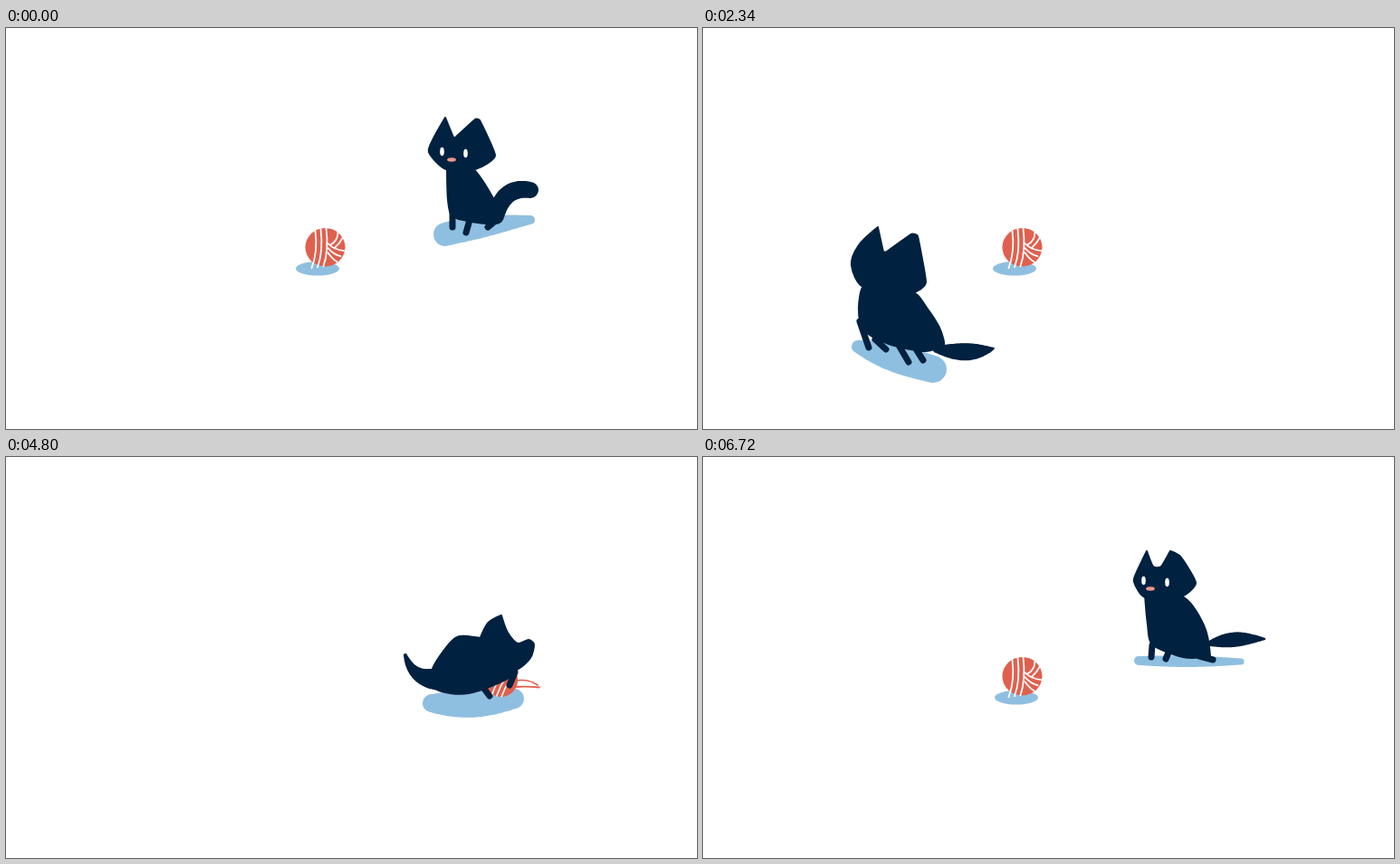
An HTML page with a canvas that plays this animation: 763x443 px, repeating every 6840 ms.

```html
<!DOCTYPE html>
<html lang="en">
<head>
<meta charset="utf-8">
<title>Cat and yarn</title>
<style>
html, body { margin: 0; width: 100%; height: 100%; overflow: hidden; background: #fff; }
canvas { display: block; }
</style>
</head>
<body>
<canvas id="stage" width="763" height="443"></canvas>
<script>
const ctx = document.getElementById('stage').getContext('2d');
const LOOP = 6840, NAVY = '#00213f', SHADE = '#8fbfe0', YARN = '#e0604e', PINK = '#f0968e';

// shadow, tail: start, bend, end, start radius, end radius, bulge
// head: cheek, left ear, right ear, cheek, chin; face: middle of eyes, nose x
const poses = {
  sit: {
    shadow: [485, 228, 520, 219, 579, 212, 13, 5, 3],
    tail: [541, 208, 549, 174, 579, 179, 9, 9, 1],
    body: [487, 150, 488, 190, 494, 209, 530, 216, 547, 211, 539, 190, 516, 156],
    head: [467, 137, 472, 122, 485, 99, 494, 121, 496, 121, 518, 101, 523, 102, 540, 141, 518, 156, 486, 156],
    legs: [[493, 202, 493, 220], [512, 212, 508, 226], [538, 215, 532, 220]],
    face: [494.5, 137.5, 492]
  },
  crouch: {
    shadow: [471, 253, 540, 273, 597, 284, 5, 14, 4],
    tail: [512, 211, 477, 210, 460, 187, 11, 1.5, 2],
    body: [573, 272, 550, 261, 521, 251, 506, 225, 506, 201, 535, 205, 563, 222],
    head: [554, 264, 564, 221, 577, 209, 582, 229, 596, 229, 604, 208, 617, 224, 625, 247, 604, 279, 572, 278],
    legs: [[520, 254, 497, 260], [557, 268, 548, 281], [603, 274, 605, 282]],
    face: [590, 250, 590]
  },
  behind: {
    shadow: [171, 352, 205, 363, 254, 377, 7, 15, 4],
    tail: [258, 355, 294, 361, 321, 354, 4, 1, 7],
    body: [177, 286, 172, 310, 177, 333, 205, 349, 245, 357, 266, 350, 261, 331, 247, 309, 232, 292],
    head: [164, 262, 172, 240, 193, 220, 199, 247, 203, 247, 230, 228, 237, 230, 246, 281, 231, 292, 177, 286],
    legs: [[173, 324, 183, 353], [190, 344, 202, 355], [217, 352, 227, 369], [236, 356, 243, 367]]
  },
  prone: {
    shadow: [195, 347, 255, 345, 287, 307, 7, 9, 7],
    tail: [148, 319, 111, 322, 157, 287, 10, 1, 3],
    body: [201, 292, 164, 314, 161, 331, 181, 348, 207, 350, 249, 322, 267, 307],
    head: [196, 279, 209, 263, 230, 254, 235, 268, 253, 268, 263, 252, 278, 262, 292, 287, 265, 309, 203, 292],
    legs: [[250, 316, 268, 316], [253, 318, 275, 321]]
  },
  grab: {
    shadow: [272, 272, 315, 275, 363, 267, 10, 11, 5],
    tail: [282, 245, 252, 248, 243, 219, 13, 2, 0],
    body: [326, 200, 298, 200, 273, 234, 278, 257, 313, 261, 361, 241, 364, 207],
    head: [324, 213, 333, 185, 349, 175, 356, 194, 367, 206, 379, 202, 385, 207, 381, 222, 366, 235, 341, 244],
    legs: [[330, 256, 336, 264], [364, 238, 358, 252]]
  },
  perk: {
    shadow: [481, 225, 535, 226, 594, 226, 5, 3.5, 2],
    tail: [560, 206, 585, 200, 620, 201, 3, 1.2, 6],
    body: [488, 152, 491, 185, 496, 207, 530, 221, 560, 220, 553, 186, 529, 154],
    head: [476, 138, 479, 127, 490, 104, 497, 121, 506, 121, 516, 104, 528, 111, 544, 139, 528, 154, 488, 155],
    legs: [[496, 208, 495, 221], [514, 216, 511, 223], [548, 220, 563, 224]],
    face: [499.5, 137.5, 494]
  }
};

const { sin, PI } = Math;
const lerp = (a, b, k) => a + (b - a) * k;
const mix = (a, b, k) => Array.isArray(a) ? a.map((v, i) => mix(v, b[i], k)) : lerp(a, b, k);
function blend(a, b, k) {
  const out = {};
  for (const part in a) out[part] = mix(a[part], b[part], k);
  return out;
}

// Each act lasts until the next one; k runs from 0 to 1 over it.
const acts = [
  [0, 'sit', k => ({ sy: 1 - 0.25 * k * k })],
  [420, 'crouch', k => ({ x: -30 * (1 - k), y: -25 * (1 - k) })],
  [840, 'crouch', k => ({ sy: 1 - 0.07 * k })],
  [1440, 'crouch', k => ({ x: -240 * k * k, y: 94 * (1 - (1 - k) ** 3), sx: -1 })],
  [2220, 'behind', () => ({ x: 38 })],
  [2340, 'behind', k => ({ sy: 1 + 0.07 * sin(2 * PI * k) })],
  [2880, 'prone', () => ({ x: 10, sx: 0.8 })],
  [3240, 'prone', k => ({ x: -10 * (1 - k) })],
  [3480, 'prone', k => ({ x: -20 * sin(PI * k) })],
  [4020, 'leap', k => ({ lift: 34 + 57 * k })],
  [4320, 'grab', k => ({ x: 600 * k ** 1.6, y: 10 * sin(2 * PI * k) })],
  [5280, 'away', () => ({})],
  [6240, 'crouch', k => ({ x: 265 - 198 * k, y: -53, sx: -1 })],
  [6600, 'perk', () => ({ x: 42 })],
  [6720, 'perk', () => ({})]
];

// A drawing stays 120 ms, these ones 60 ms longer.
const holds = new Set([0, 420, 1080, 1260, 1800, 2580, 2880, 3060, 3720, 4140]);
const steps = [];
for (let t = 0; t < LOOP; t += holds.has(t) ? 180 : 120) steps.push(t);

// Smooth closed outline that keeps sharp turns as corners.
function outline(list) {
  const pts = [];
  for (let i = 0; i < list.length; i += 2) pts.push([list[i], list[i + 1]]);
  const n = pts.length;
  const handles = pts.map((p, i) => {
    const a = pts[(i + n - 1) % n], b = pts[(i + 1) % n];
    const ux = p[0] - a[0], uy = p[1] - a[1], vx = b[0] - p[0], vy = b[1] - p[1];
    const u = Math.hypot(ux, uy), v = Math.hypot(vx, vy);
    const straight = Math.sqrt(Math.max(0, (ux * vx + uy * vy) / (u * v)));
    const size = 0.38 * straight * Math.min(u, v) / Math.hypot(ux + vx, uy + vy);
    return [(ux + vx) * size, (uy + vy) * size];
  });
  ctx.beginPath();
  ctx.moveTo(...pts[0]);
  pts.forEach((p, i) => {
    const j = (i + 1) % n, q = pts[j], h = handles[i], g = handles[j];
    ctx.bezierCurveTo(p[0] + h[0], p[1] + h[1], q[0] - g[0], q[1] - g[1], ...q);
  });
  ctx.closePath();
  ctx.fillStyle = ctx.strokeStyle = NAVY;
  ctx.lineWidth = 2;
  ctx.fill();
  ctx.stroke();
}

// Round brush along a bend, changing in width.
function sweep([ax, ay, bx, by, cx, cy, r0, r1, bulge], color) {
  ctx.fillStyle = color;
  ctx.beginPath();
  for (let u = 0; u <= 1; u += 1 / 64) {
    const x = lerp(lerp(ax, bx, u), lerp(bx, cx, u), u);
    const y = lerp(lerp(ay, by, u), lerp(by, cy, u), u);
    const r = lerp(r0, r1, u) + bulge * sin(PI * u);
    ctx.moveTo(x + r, y);
    ctx.arc(x, y, r, 0, 2 * PI);
  }
  ctx.fill();
}

function oval(x, y, rx, ry, color) {
  ctx.fillStyle = color;
  ctx.beginPath();
  ctx.ellipse(x, y, rx, ry, 0, 0, 2 * PI);
  ctx.fill();
}

function curve(x1, y1, cx, cy, x2, y2, width, color) {
  ctx.strokeStyle = color;
  ctx.lineWidth = width;
  ctx.beginPath();
  ctx.moveTo(x1, y1);
  ctx.quadraticCurveTo(cx, cy, x2, y2);
  ctx.stroke();
}

function yarn(x, y, size, turn) {
  ctx.save();
  ctx.translate(x, y);
  ctx.rotate(turn);
  ctx.scale(size, size);
  oval(0, 0, 22, 21.2, YARN);
  for (let i = 0; i < 3; i++) {
    curve(-11 + 6 * i, -18 - 2 * i, -8 + 6 * i, 5, -15 + 6.5 * i, 23 - i, 1.8, '#fff');
    curve(3, -4 + 5 * i, 10 - i, 3 + 5 * i, 21 - 4 * i, 4 + 6 * i, 1.8, '#fff');
  }
  for (let i = 0; i < 2; i++) curve(14 + 5 * i, -17 + 7 * i, 14 + 2 * i, -7 + 3 * i, 6 + 5 * i, -3 + 3 * i, 1.8, '#fff');
  ctx.restore();
}

function ball(t) {
  if (t >= 4320 && t < 5880) return;
  const late = t >= 5880;
  const x = late ? 370 * Math.max(0, 1 - (t - 5880) / 480) ** 2 : 0;
  oval((late ? 346 : 344) + x, 265.8, 24, 7.8, SHADE);
  yarn(352.5 + x, 242.2, 1, x / 22);
}

function cat(t) {
  const i = acts.findLastIndex(act => act[0] <= t);
  const [start, name, move] = acts[i];
  if (name === 'away') return;
  const end = acts[i + 1] ? acts[i + 1][0] : LOOP;
  const k = (t - start) / (end - start);
  const p = name === 'leap' ? blend(poses.prone, poses.grab, 0.35 + k) : poses[name];
  const { x = 0, y = 0, sx = 1, sy = 1, lift = 0 } = move(k);
  const [, , px, py] = p.shadow;

  ctx.save();
  ctx.translate(px + x, py + y);
  ctx.scale(sx, sy);
  ctx.translate(-px, -py);
  sweep(p.shadow, SHADE);
  ctx.translate(0, -lift);
  if (name === 'grab') {
    curve(364, 247, 380, 245, 389, 252, 1.6, YARN);
    curve(364, 254, 376, 253, 391, 254.5, 1.8, YARN);
    yarn(348, 246, 0.88, x / 20);
  }
  sweep(p.tail, NAVY);
  for (const [x1, y1, x2, y2] of p.legs) curve(x1, y1, x1, y1, x2, y2, 7, NAVY);
  outline(p.body);
  outline(p.head);
  if (p.face) {
    const [mx, my, nose] = p.face;
    for (const side of [-1, 1]) oval(mx + 13 * side, my + side, 2.3, 4.7, '#fff');
    oval(nose, my + 8, 4.8, 2.2, PINK);
  }
  ctx.restore();
}

function draw() {
  const now = performance.now() % LOOP;
  const t = steps.findLast(s => s <= now);
  ctx.fillStyle = '#fff';
  ctx.fillRect(0, 0, 763, 443);
  ctx.lineCap = ctx.lineJoin = 'round';
  ball(t);
  cat(t);
  requestAnimationFrame(draw);
}
draw();
</script>
</body>
</html>
```
